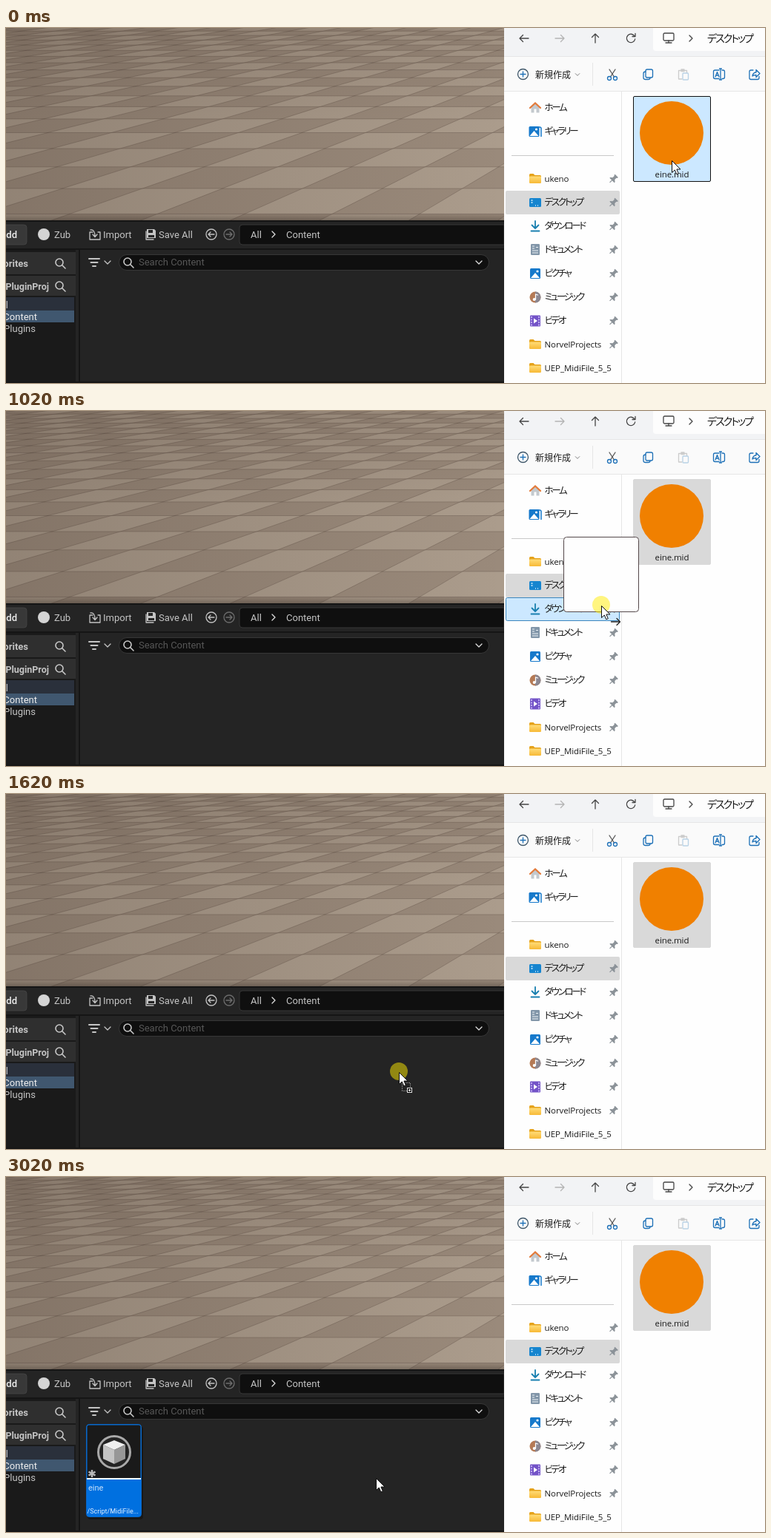
An HTML page that plays this animation: 1024 by 480 pixels, repeating every 3.82 s.

```html
<!DOCTYPE html>
<html lang="ja">
<head>
<meta charset="utf-8">
<title>Drag a MIDI file into the content browser</title>
<style>
  html, body { margin: 0; width: 100%; height: 100%; overflow: hidden; background: #242424; }
  svg { display: block; width: 100%; height: 100%; }
  text { white-space: pre; }
  .ui { font: 13px Roboto, sans-serif; fill: #c4c4c4; }
  .win { font: 11.5px "Open Sans", sans-serif; fill: #1b1b1b; letter-spacing: -.1px; }
  .jp { font: 12.5px "Noto Sans CJK JP", "Noto Sans CJK", sans-serif; fill: #1b1b1b;
        font-feature-settings: "palt"; letter-spacing: -2.3px; }
  .kanji { font: 12px "Noto Sans CJK JP", "Noto Sans CJK", sans-serif; fill: #1b1b1b; }
  .line { fill: none; stroke-width: 1.3; stroke-linecap: round; stroke-linejoin: round; }
</style>
</head>
<body>
<svg viewBox="0 0 1024 480" preserveAspectRatio="none">
  <defs>
    <linearGradient id="side">
      <stop offset="0" stop-color="#2c2019" stop-opacity=".2"/>
      <stop offset="1" stop-color="#2c2019" stop-opacity="0"/>
    </linearGradient>
    <linearGradient id="depth" x2="0" y2="1">
      <stop offset="0" stop-color="#3a2b22" stop-opacity=".12"/>
      <stop offset=".5" stop-color="#3a2b22" stop-opacity="0"/>
      <stop offset=".96" stop-color="#3a2b22" stop-opacity="0"/>
      <stop offset="1" stop-color="#1c1511" stop-opacity=".3"/>
    </linearGradient>
    <linearGradient id="folderFill" x2="0" y2="1">
      <stop offset="0" stop-color="#ffdc78"/><stop offset="1" stop-color="#f7b936"/>
    </linearGradient>
    <clipPath id="floorClip"><path d="M0 0H672V260H0z"/></clipPath>
    <g id="lens" class="line" stroke="#c8c8c8" style="stroke-width:1.6">
      <circle cx="-1" cy="-1" r="5"/><path d="M2.8 2.8L7 7"/>
    </g>
    <path id="chevron" class="line" d="M-4 -2L0 2L4 -2"/>
    <g id="folder">
      <path d="M-8 -5q0-1.5 1.5-1.5h4l2 2h7q1.5 0 1.5 1.5v2h-16z" fill="#e5a21b"/>
      <rect x="-8" y="-3" width="16" height="9.5" rx="1.3" fill="url(#folderFill)"/>
    </g>
    <g id="pin" transform="rotate(45)">
      <path d="M-3-6h6v1.5l-1 .8v3.2l2.5 2v1.3h-9v-1.3l2.5-2v-3.2l-1-.8z" fill="#8b9298"/>
      <path d="M0 2V7" stroke="#8b9298" stroke-width="1.2"/>
    </g>
    <g id="photo">
      <rect x="-7" y="-7" width="14" height="14" rx="1.5" fill="#1679cb"/>
      <path d="M-6 6L0 -1L6 6z" fill="#fff"/><circle cx="3" cy="-3" r="1.6" fill="#fff"/>
    </g>
    <path id="arrow" class="line" d="M-6 0H6M1.5 -4.5L6 0L1.5 4.5"/>
  </defs>

  <!-- viewport floor -->
  <g clip-path="url(#floorClip)">
    <path d="M0 0H672V260H0z" fill="#ab9c8c"/>
    <path id="tiles" fill="#503b30" fill-opacity=".19"/>
    <path id="grout" fill="none" stroke="#594a40" stroke-opacity=".42" stroke-width=".8"/>
    <path d="M0 0H672V260H0z" fill="url(#side)"/>
    <path d="M0 0H672V260H0z" fill="url(#depth)"/>
  </g>

  <!-- content browser -->
  <g>
    <path d="M0 260H672V480H0z" fill="#151515"/>
    <path d="M0 262H672V298H0z" fill="#242424"/>
    <path d="M100 300H672V478H100z" fill="#242424"/>
    <path d="M0 300H98V478H0z" fill="#242424"/>
    <path d="M0 300H94V478H0z" fill="#1a1a1a"/>
    <path d="M0 303H94V333H0zM0 335H94V362H0z" fill="#2f2f2f"/>
    <path d="M0 364H92V382H0z" fill="#2a303b"/>
    <path d="M0 382H92V398H0z" fill="#40576f"/>
    <rect x="-9" y="266" width="37" height="27" rx="4" fill="#383838" stroke="#4a4a4a" stroke-width=".7"/>
    <path d="M672 266H319q-4 0-4 4v19q0 4 4 4H672z" fill="#0f0f0f" stroke="#363636"/>
    <rect x="152.5" y="306.5" width="499" height="21" rx="10.5" fill="#0f0f0f" stroke="#373737"/>
    <circle cx="51" cy="279" r="8" fill="#d4d4d4"/>
    <g class="line" stroke="#c4c4c4">
      <path d="M117 276h-4v10h14v-10h-3M114 273q6-1 6 9m-3-3l3 3.5l3-3.5"/>
      <circle cx="277" cy="279" r="7"/><path d="M281 279h-8m3-3l-3 3l3 3"/>
      <g stroke="#6d6d6d"><circle cx="301" cy="279" r="7"/><path d="M297 279h8m-3-3l3 3l-3 3"/></g>
      <path d="M112 312h14M114.500 317h9M117 322h4" stroke-width="2"/>
    </g>
    <path d="M190 272h10l2 2v10h-12z" fill="#c4c4c4"/>
    <path d="M192 273h6v4h-6zM192 280h8v3h-8z" fill="#242424"/>
    <path d="M189 275v11h10" class="line" stroke="#c4c4c4"/>
    <use href="#chevron" x="137" y="317" stroke="#c4c4c4"/>
    <use href="#chevron" x="638" y="317" stroke="#ddd" style="stroke-width:2"/>
    <use href="#chevron" transform="translate(361 279) rotate(-90)" stroke="#ddd"/>
    <use href="#lens" x="73" y="318"/><use href="#lens" x="73" y="349"/><use href="#lens" x="165" y="317"/>
    <g class="ui">
      <g text-anchor="end">
        <text x="15" y="284" font-weight="500" style="fill:#eee">Add</text>
        <text x="30" y="323" style="font-weight:700">Favorites</text>
        <text x="58" y="354" style="font-weight:700;font-size:12.500px">PluginProj</text>
        <text x="3" y="379">All</text>
        <text x="42" y="395" style="fill:#eee">Content</text>
        <text x="40" y="411">Plugins</text>
      </g>
      <text x="65" y="284">Zub</text>
      <text x="131" y="284">Import</text>
      <text x="206" y="284">Save All</text>
      <text x="330" y="284">All</text>
      <text x="378" y="284">Content</text>
      <text x="179" y="321" style="fill:#575757">Search Content</text>
    </g>
    <g id="asset">
      <rect x="110" y="337" width="75" height="126" rx="4" fill="#111" opacity=".6"/>
      <rect x="108.500" y="334.500" width="74" height="125" rx="4" fill="#0070e0" stroke="#0a68c9"/>
      <path d="M109.500 407V338q0-2.500 2.500-2.500h67q2.500 0 2.500 2.500v69z" fill="#1a1a1a"/>
      <path d="M109 407h73v2h-73z" fill="#fff"/>
      <circle cx="146" cy="372" r="21.500" fill="#242424" stroke="#a9a9a9" stroke-width="3"/>
      <path d="M146 356l15 6l-15 7l-15-7z" fill="#efefef"/>
      <path d="M131 362l15 7v19l-15-7z" fill="#c4c4c4"/>
      <path d="M161 362l-15 7v19l15-7z" fill="#979797"/>
      <path d="M116 396v10M111.500 398.500l9 5M111.500 403.500l9-5" stroke="#b8b8b8" stroke-width="2.500"/>
      <text class="ui" x="111" y="424" style="font-size:11px;fill:#c9e2fc">eine</text>
      <text class="ui" x="109.500" y="455" style="font-size:9px;fill:#e3f0ff">/Script/MidiFile...</text>
    </g>
  </g>

  <!-- file explorer -->
  <g>
    <path d="M672 0H1024V480H672z" fill="#fefefe"/>
    <path d="M672 0H1024V38H672z" fill="#f2f3f5"/>
    <path d="M873 0H1024V31H877q-4 0-4-4z" fill="#fdfdfd"/>
    <path d="M672 39H1024V85H672z" fill="#fafafa"/>
    <path d="M672 38.500H1024M672 85.500H1024M791.500 47V78M830.500 86V480" stroke="#e6e6e6"/>
    <path d="M682 172.500H820" stroke="#c9c9c9"/>
    <use href="#arrow" transform="translate(699 14) scale(-1 1)" stroke="#444"/>
    <use href="#arrow" x="747" y="14" stroke="#b4b4b4"/>
    <use href="#arrow" transform="translate(795 14) rotate(-90)" stroke="#444"/>
    <g class="line" stroke="#444">
      <path d="M848 11a5.700 5.700 0 1 0 .7 4M849 7.500v4h-4"/>
      <rect x="887" y="7" width="14" height="10" rx="1.500"/><path d="M894 17v3M890 20h8"/>
    </g>
    <use href="#chevron" transform="translate(924 14) rotate(-90)" stroke="#444"/>
    <use href="#chevron" transform="translate(771 63) scale(.7)" stroke="#777"/>
    <g class="line" stroke="#1d70b7">
      <circle cx="697.500" cy="62.500" r="7" stroke="#3d5568"/><path d="M694 62.500h7M697.500 59v7"/>
      <path d="M814 56l6.500 10M822 56l-6.500 10" stroke="#555"/>
      <circle cx="814" cy="68" r="2.500"/><circle cx="822" cy="68" r="2.500"/>
      <rect x="863" y="56" width="9.500" height="11" rx="2"/><path d="M863 59q-3 0-3 2.500v5.500q0 2.500 2.500 2.500h4q2.500 0 2.500-2"/>
      <g stroke="#b9d2e6"><path d="M912 69h-4.500V57.500h11v3M911 56h4v2.500h-4z" stroke="#ccc"/><rect x="913" y="61" width="7.500" height="9" rx="1"/></g>
      <path d="M962 57h-5.500q-2 0-2 2v7.500q0 2 2 2h5.500M966 57h1.500q2 0 2 2v7.500q0 2-2 2H966M964 55v15M962.500 55h3M962.500 70h3M957 66l2.500-6.500l2.500 6.500M958 64h3"/>
      <path d="M1008 57h-3q-2 0-2 2v8.500q0 2 2 2h9q2 0 2-2v-2M1007 65q1-5 5-5v-3.500l5 5l-5 5v-3q-3 0-5 1.500z"/>
    </g>
    <text class="kanji" x="714" y="67.500">新規作成</text>
    <text class="jp" x="946" y="18.500" style="font-size:14px;letter-spacing:-2px">デスクトップ</text>

    <rect x="674" y="220" width="154" height="32" rx="2" fill="#d9d9d9"/>
    <rect id="hover" x="674.500" y="252.500" width="153" height="31" rx="2" fill="#cce8ff" stroke="#3b86bd"/>
    <g id="places"></g>

    <g transform="translate(714 107.500)">
      <path d="M-5.500-1.500L0-6l5.500 4.500V7h-4V2h-3v5h-4z" fill="#c3c9ce"/>
      <path d="M-7 .5L0-6L7 .5" fill="none" stroke="#e37b3b" stroke-width="2.300" stroke-linecap="round"/>
    </g>
    <path d="M709 134h11q2 0 2 2v11" fill="none" stroke="#1679cb" stroke-width="1.500"/>
    <use href="#photo" x="712.500" y="140"/>
    <use href="#folder" x="714" y="203.500"/>
    <rect x="706" y="230" width="16" height="12" rx="1.500" fill="#1685cf"/>
    <path d="M708.500 233h2M708.500 236h2M714 240h1M717 240h1" stroke="#d6f0ff" stroke-width="1.500"/>
    <path d="M714 261v10m-4.500-4.500l4.500 4.500l4.500-4.500M708.500 274.500h11" class="line" stroke="#187faf" style="stroke-width:1.800"/>
    <rect x="708" y="292" width="12" height="15" rx="1.200" fill="#8296a9"/>
    <path d="M710 295h3M710 298h3M715 296.500h3M710 301h8M710 304h8" stroke="#eef3f7" stroke-width="1.200"/>
    <use href="#photo" x="714" y="332"/>
    <circle cx="714" cy="364" r="7.500" fill="#b57a55"/>
    <path d="M714 356.500a7.500 7.500 0 0 1 0 15z" fill="#8b8791"/>
    <path d="M714.500 367v-7l3 1" class="line" stroke="#fff"/><circle cx="712.700" cy="367" r="2" fill="#fff"/>
    <rect x="707" y="388.500" width="14" height="15" rx="1" fill="#7353c7"/>
    <path d="M709 390v13M719 390v13" stroke="#d9ccff" stroke-width="1.500" stroke-dasharray="2 1.500"/>
    <path d="M712 392.500l5 3.500l-5 3.500z" fill="#fff"/>
    <use href="#folder" x="714" y="427.500"/><use href="#folder" x="714" y="459.500"/>

    <rect id="selection" x="846.500" y="92.500" width="104" height="115" rx="1.500"/>
    <circle cx="898" cy="142" r="43" fill="#f08000"/>
    <text class="win" x="898.500" y="202" text-anchor="middle">eine.mid</text>
  </g>

  <!-- drag overlay -->
  <rect id="ghost" width="101" height="101" rx="4" fill="#fefefe" stroke="#54484a"/>
  <g id="moveArrow"><use href="#arrow" x="822.500" y="285" stroke="#222"/></g>
  <g id="tip">
    <rect x="789.500" y="305.500" width="113" height="19" rx="3" fill="#f9f9f9" stroke="#d8d8d8"/>
    <use href="#arrow" x="798" y="315" stroke="#222"/>
    <text class="jp" x="808.500" y="319">ドキュメント</text>
    <text class="kanji" x="862" y="319" style="fill:#1a6fc4;letter-spacing:-.5px">へ移動</text>
  </g>
  <g id="pointer">
    <circle id="press" cy="-1" r="12" fill="#ffeb00" fill-opacity=".5"/>
    <g id="copy">
      <path d="M4.500 14.500h11v11h-11z" fill="none" stroke="#ddd" stroke-dasharray="1 2"/>
      <rect x="11.500" y="21.500" width="6" height="6" fill="#1b1b1b" stroke="#ddd"/>
      <path d="M13 24.500h3M14.500 23v3" stroke="#fff"/>
    </g>
    <path d="M.5.5V16.500L4.300 13L6.800 18.800L9.300 17.700L6.900 12H12z" fill="#fff" stroke="#111"/>
  </g>
</svg>

<script>
const $ = id => document.getElementById(id);

// One-point perspective: rows stay level, columns meet at the vanishing point.
function buildFloor() {
  const vanishX = 1230, horizon = -150, rows = 19, cols = 36;
  const point = (col, row) => {
    const d = 1 / (0.00249 + 0.000235 * row);
    return `${(vanishX + (col + 0.306) * 0.294 * d).toFixed(1)} ${(horizon + d).toFixed(1)}`;
  };
  let tiles = '', grout = '';
  for (let row = -1; row < rows; row++) {
    grout += `M${point(-cols, row)}L${point(0, row)}`;
    for (let col = -cols; col < 0; col++) {
      if ((col + row) % 2 === 0) continue;
      tiles += `M${point(col, row)}L${point(col + 1, row)}L${point(col + 1, row + 1)}L${point(col, row + 1)}z`;
    }
  }
  for (let col = -cols; col < 0; col++) grout += `M${point(col, -1)}L${point(col, rows)}`;
  $('tiles').setAttribute('d', tiles);
  $('grout').setAttribute('d', grout);
}

// label, row centre, pinned
const places = [
  ['ホーム', 107], ['ギャラリー', 139],
  ['ukeno', 203, 1], ['デスクトップ', 235, 1], ['ダウンロード', 267, 1], ['ドキュメント', 299, 1],
  ['ピクチャ', 331, 1], ['ミュージック', 363, 1], ['ビデオ', 395, 1],
  ['NorvelProjects', 427, 1], ['UEP_MidiFile_5_5', 459]
];
$('places').innerHTML = places.map(([label, y, pinned]) =>
  `<text class="${/^\w/.test(label) ? 'win' : 'jp'}" x="726.5" y="${y + 5}">${label}</text>` +
  (pinned ? `<use href="#pin" transform="translate(819.5 ${y + 1})"/>` : '')
).join('');

// start ms, pointer x, pointer y, visible extras, ghost position
const LOOP = 3820;
const steps = [
  [0, 898, 179, 'focus'],
  [200, 898, 175, 'focus'],
  [400, 897, 170, 'focus'],
  [820, 897, 170, 'focus press'],
  [1020, 803, 263, 'press ghost hover moveArrow', [752.5, 170.5]],
  [1220, 755, 319, 'press ghost tip', [727.5, 200.5]],
  [1420, 640, 350, 'press copy'],
  [1620, 530, 376, 'press copy'],
  [2020, 503, 403, ''],
  [2220, 499, 407, ''],
  [3020, 499, 407, 'asset']
];
const extras = ['press', 'ghost', 'hover', 'moveArrow', 'tip', 'copy', 'asset'];
let shown;

function show(step) {
  const [, x, y, flags, ghost] = step;
  const on = flags.split(' ');
  for (const id of extras) $(id).style.display = on.includes(id) ? '' : 'none';
  $('pointer').setAttribute('transform', `translate(${x} ${y})`);
  if (ghost) $('ghost').setAttribute('transform', `translate(${ghost})`);
  const focused = on.includes('focus');
  $('selection').setAttribute('fill', focused ? '#cce8ff' : '#d9d9d9');
  $('selection').setAttribute('stroke', focused ? '#111' : '#d9d9d9');
}

function tick() {
  const t = performance.now() % LOOP;
  const step = steps.findLast(s => s[0] <= t);
  if (step !== shown) show(shown = step);
  requestAnimationFrame(tick);
}

buildFloor();
tick();
</script>
</body>
</html>
```
